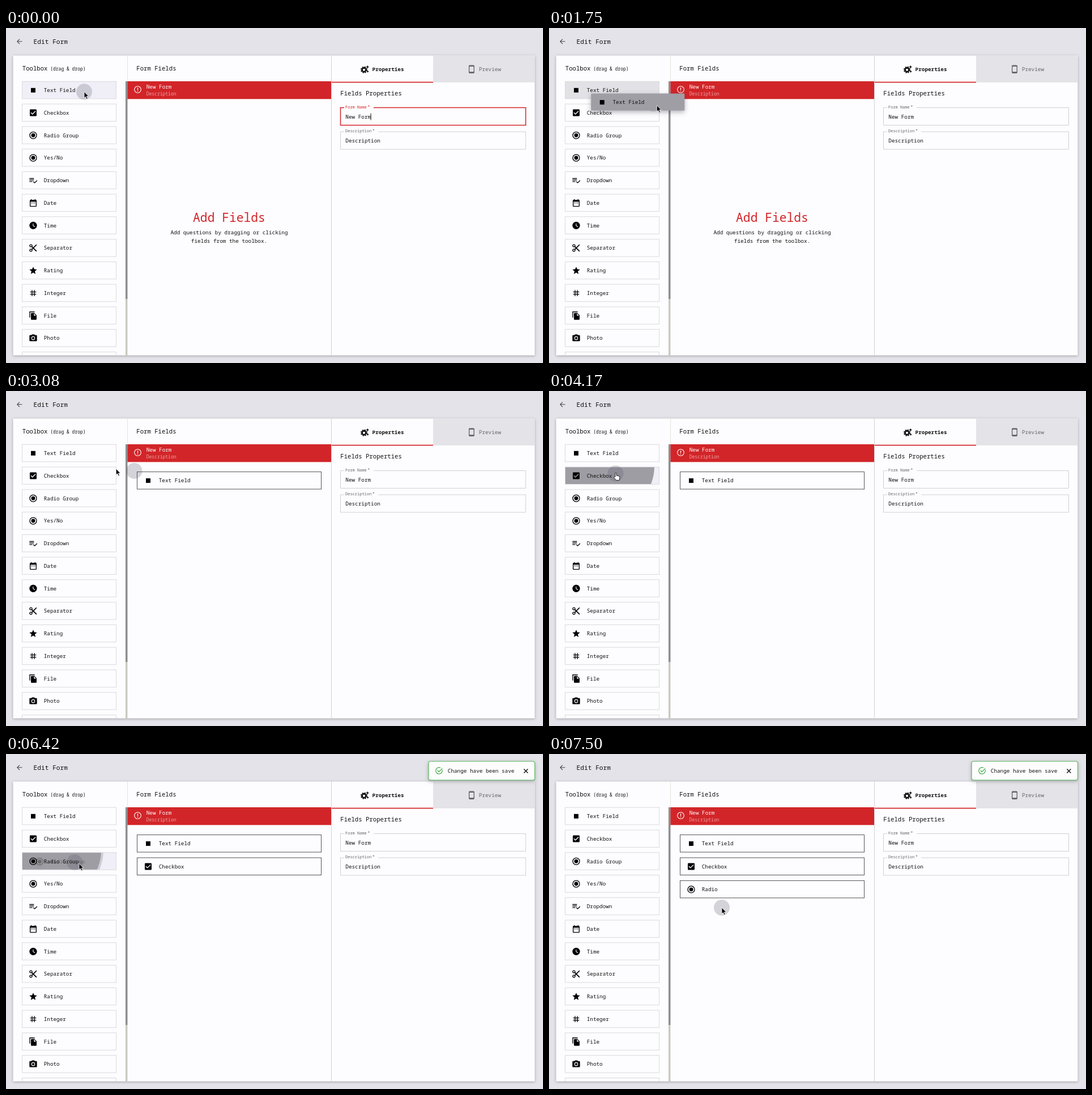
Write an HTML page that moves like this. It is 948 by 591 pixels and loops after 8000 ms.

```html
<!DOCTYPE html>
<html lang="en">
<head>
<meta charset="utf-8">
<title>Edit Form</title>
<style>
html, body { margin: 0; width: 100%; height: 100%; overflow: hidden; background: #e4e3e9; }
svg { display: block; }
#stage { position: absolute; left: 0; top: 0; }
text { font-family: "Noto Sans Mono", "DejaVu Sans Mono", monospace; font-size: 9.33px; fill: #111; white-space: pre; }
.medium { font-weight: 500; }
.bold { font-weight: 600; }
.head { font-size: 10.65px; }
.small { font-size: 8px; }
.label { font-size: 7px; fill: #666; }
.line { fill: none; stroke: currentColor; }
#panel { filter: drop-shadow(0 1px 2px rgba(0,0,0,.3)); }
#ghost { filter: drop-shadow(0 3px 4px rgba(40,40,60,.35)); }
#toast { filter: drop-shadow(0 2px 3px rgba(0,0,0,.25)); }
</style>
</head>
<body>
<svg id="stage" width="948" height="591" viewBox="0 0 948 591"></svg>
<script>
const LOOP = 8000;
const RED = '#d22529';
const ROW = { x: 28.5, y: 94.3, w: 166, h: 30.5, step: 39.76 };
const SLOT = { x: 231.5, y: 142.6, w: 325, step: 40.4 };

// Icons live in a 24-unit box centred on the given point.
const ICONS = {
  square: '<path d="M6 6h12v12H6z"/>',
  check: '<path fill-rule="evenodd" d="M5 3h14a2 2 0 0 1 2 2v14a2 2 0 0 1-2 2H5a2 2 0 0 1-2-2V5a2 2 0 0 1 2-2zM10 17l9-9-1.4-1.4-7.6 7.6-3.6-3.6L5 12z"/>',
  radio: '<circle cx="12" cy="12" r="9" class="line" stroke-width="2"/><circle cx="12" cy="12" r="5.2"/>',
  list: '<path class="line" stroke-width="2" d="M2 7h12M2 11h12M2 15h8M12.2 14.8 16 18.5l6.3-6.3"/>',
  date: '<path fill-rule="evenodd" d="M5 4h1V2h2v2h8V2h2v2h1a2 2 0 0 1 2 2v14a2 2 0 0 1-2 2H5a2 2 0 0 1-2-2V6a2 2 0 0 1 2-2zM5 9v11h14V9zM7 11h2v2H7zM11 11h2v2h-2zM15 11h2v2h-2z"/>',
  time: '<circle cx="12" cy="12" r="10"/><path stroke="#fff" stroke-width="1.6" fill="none" d="M11.8 7v5.6l4.8 2.9"/>',
  cut: '<g class="line" stroke-width="2"><circle cx="6" cy="6" r="3"/><circle cx="6" cy="18" r="3"/><path stroke-width="2.6" d="M8 8 20.8 20.8M8 16 20.8 3.2"/></g>',
  star: '<path d="M12 17.3 18.2 21l-1.7-7L22 9.2l-7.2-.6L12 2 9.2 8.6 2 9.2 7.5 14l-1.7 7z"/>',
  hash: '<path class="line" stroke-width="2" d="M9 4v16M15 4v16M4 9h16M4 15h16"/>',
  file: '<path class="line" stroke-width="2" d="M16 2H3v15"/><path fill-rule="evenodd" d="M8 5h7l6 6v10a2 2 0 0 1-2 2H8a2 2 0 0 1-2-2V7a2 2 0 0 1 2-2zM14 12h5.5L14 6.5z"/>',
  photo: '<path fill-rule="evenodd" d="M9 2 7.2 4H4a2 2 0 0 0-2 2v12a2 2 0 0 0 2 2h16a2 2 0 0 0 2-2V6a2 2 0 0 0-2-2h-3.2L15 2zM12 7a5 5 0 0 1 0 10a5 5 0 0 1 0-10z"/><circle cx="12" cy="12" r="3.2"/>'
};

const TOOLS = [['Text Field', 'square'], ['Checkbox', 'check'], ['Radio Group', 'radio'],
  ['Yes/No', 'radio'], ['Dropdown', 'list'], ['Date', 'date'], ['Time', 'time'],
  ['Separator', 'cut'], ['Rating', 'star'], ['Integer', 'hash'], ['File', 'file'], ['Photo', 'photo']];
const ADDED = ['Text Field', 'Checkbox', 'Radio'];

// One entry per dragged tool; ripple rows are [time, x, y, radius, opacity].
const DRAGS = [
  { press: 670, grab: 1330, enter: 2000, sort: [2000, 2001], drop: 2500, dx: -116, dy: -21,
    ripple: [[670, 145, 115, 0, 1], [1000, 112, 108, 92, 1], [1420, 112, 108, 92, 0]] },
  { press: 4000, grab: 4420, enter: 4670, sort: [4780, 5117], drop: 5330, dx: -91, dy: -10,
    ripple: [[4000, 117, 146, 0, 1], [4150, 102, 133, 84, 1], [4420, 102, 133, 84, 1], [4700, 95, 131, 84, 1]] },
  { press: 6080, grab: 6375, enter: 6620, sort: [6830, 7170], drop: 7500, dx: -89, dy: -19,
    ripple: [[6080, 120, 191, 0, 1], [6330, 86, 170, 82, 1]] }
];

// Pointer tip: [time, x, y]
const PATH = [[600, 138, 112.5], [700, 145, 115], [1330, 145, 115], [1420, 149, 116], [1690, 184, 133],
  [1750, 190, 136.5], [2080, 280, 154], [2250, 300, 160], [2930, 300, 160], [3020, 227, 141],
  [3080, 194.5, 137], [3250, 140, 143], [3580, 117.5, 145.5], [4170, 117.5, 145.5], [4420, 121, 146],
  [4580, 150, 158], [4750, 270, 205], [4850, 303, 220], [5000, 305, 220], [5590, 305, 220],
  [5670, 270, 212], [5750, 195, 199], [5920, 121, 191], [6360, 121, 191], [6420, 128.5, 193],
  [6580, 200, 225], [6750, 290, 265], [6830, 305, 271]];

const text = (x, y, s, cls = '', more = '') => `<text x="${x}" y="${y}" class="${cls}" ${more}>${s}</text>`;
const rect = (x, y, w, h, fill, more = '') => `<rect x="${x}" y="${y}" width="${w}" height="${h}" fill="${fill}" ${more}/>`;
const line = (d, color, width = 1) => `<path d="${d}" fill="none" stroke="${color}" stroke-width="${width}"/>`;
const icon = (x, y, name) => `<g transform="translate(${x - 8} ${y - 8}) scale(.6667)">${ICONS[name]}</g>`;
const caption = (name, kind) => icon(19.5, 15.5, kind) + text(38.2, 18.7, name);
const card = (id, w, name, kind, stroke) =>
  `<g id="${id}">${rect(0, 0, w, ROW.h, '#fdfcfe', `stroke="${stroke}"`)}${caption(name, kind)}</g>`;
const rowY = i => ROW.y + i * ROW.step;

function input(id, y, label, value, notchEnd) {
  const d = `M597 ${y}H590.5v31h327v-31H${notchEnd}`;
  return `<path id="${id}" d="${d}" fill="none" stroke="#d0d0d3"/>` +
    `<text id="${id}Label" x="599" y="${y + 1.4}" class="label">${label}<tspan dx="1.5">*</tspan></text>` +
    text(599.3, y + 19.2, value);
}

function toolbox() {
  const rows = TOOLS.map(([name, kind], i) =>
    `<g transform="translate(${ROW.x} ${rowY(i)})">
      ${rect(0, 0, ROW.w, ROW.h, '#fdfcfe', `id="row${i}" stroke="#dadadd"`)}</g>`).join('');
  const captions = TOOLS.map(([name, kind], i) =>
    `<g transform="translate(${ROW.x} ${rowY(i)})">${caption(name, kind)}</g>`).join('');
  return rows + line(`M28.5 577v-5.5h166v5.5`, '#dadadd') +
    `<svg id="ripple" x="29" width="165" height="29.5">
      <circle id="rippleRing" fill="#cfced6"/><circle id="rippleDisc" fill="#9e9da3"/></svg>` + captions;
}

const gear = `<g stroke="#111" fill="none">
  <circle cx="632" cy="73.8" r="3.4" stroke-width="2.6"/>
  <circle cx="632" cy="73.8" r="5.2" stroke-width="1.6" stroke-dasharray="2.5 1.58"/>
  </g><path d="M638.2 65.8l.9 2 2 .9-2 .9-.9 2-.9-2-2-.9 2-.9zM638.6 74.5l.7 1.5 1.5.7-1.5.7-.7 1.5-.7-1.5-1.5-.7 1.5-.7z"/>`;

document.getElementById('stage').innerHTML = `
  ${rect(0, 0, 948, 591, '#e4e3e9')}
  ${line('M28.5 23.8H20M24 19.6l-4.2 4.2 4.2 4.2', '#444', 1.1)}
  ${text(48.6, 27.8, 'Edit Form', 'medium', 'style="font-size:11.2px"')}
  ${rect(12.5, 48.5, 921, 529, '#fdfcfe', 'id="panel"')}
  ${text(28.8, 75, 'Toolbox', 'head')}${text(78.2, 75, '(drag &amp; drop)', 'small')}
  ${toolbox()}
  ${line('M214.5 48.5v46', '#e6e6dc')}
  ${rect(211, 94, 3.4, 483.5, '#c9c9bf')}${rect(211, 94, 3.4, 384, '#8e8e90')}
  ${text(230.3, 75, 'Form Fields', 'head')}
  ${rect(214.4, 94, 359.6, 31.3, RED)}
  <circle cx="232.5" cy="108.5" r="5.8" fill="none" stroke="#fff" stroke-width="1.1"/>
  ${line('M232.5 105.2v4M232.5 110.4v1.4', '#fff', 1.3)}
  ${text(247.7, 106.7, 'New Form', 'medium', 'style="fill:#fff"')}
  ${text(247.7, 118.8, 'Description', 'small', 'style="fill:#eca2a2"')}
  <g id="empty" text-anchor="middle">
    ${text(394, 342, 'Add Fields', '', `style="font-size:21.3px;fill:${RED}"`)}
    ${text(394, 363.5, 'Add questions by dragging or clicking', 'medium')}
    ${text(394, 378.5, 'fields from the toolbox.', 'medium')}
  </g>
  ${ADDED.map((name, i) => card('entry' + i, SLOT.w, name, TOOLS[i][1], '#555')).join('')}
  ${line('M574.5 48.5v529', '#d2d2d6')}
  ${rect(754, 48.5, 179.5, 47.5, '#e4e3e8')}
  ${rect(575, 94.8, 179, 1.7, RED)}
  ${gear}${text(646.6, 76.2, 'Properties', 'bold')}
  <rect x="817.6" y="66" width="8.6" height="13.4" rx="1.3" fill="none" stroke="#555" stroke-width="1.2"/>
  ${line('M817.6 67.3h8.6M817.6 78h8.6', '#555', 1.4)}
  ${text(834.8, 76.2, 'Preview', 'medium', 'style="fill:#666"')}
  ${text(590.3, 118.6, 'Fields Properties', 'head')}
  ${input('name', 140.5, 'Form Name', 'New Form', 649)}
  ${input('about', 183, 'Description', 'Description', 657)}
  ${rect(643.6, 150.5, 1, 12, '#111', 'id="caret"')}
  <circle id="halo" r="14" fill="#55556a" fill-opacity=".24"/>
  <g id="ghost">${rect(0, 0, 165, 30, '#9f9ea5', 'id="ghostBack"')}
    ${ADDED.map((_, i) => `<g id="ghost${i}">${caption(...TOOLS[i])}</g>`).join('')}</g>
  <g id="toast">
    ${rect(746, 13, 187.5, 33, '#fdfdfd', 'rx="3" stroke="#5cb860" stroke-width="1.2"')}
    ${line('M770 27.6a5.8 5.8 0 1 1-3-3.4M761.6 28.8l2.6 2.6 6-6', '#3fa844', 1.2)}
    ${text(779.8, 33, 'Change have been save')}
    ${line('M914.3 26.4l7 7M921.3 26.4l-7 7', '#111', 1.4)}
  </g>
  <g id="pointer">
    <path id="arrow" d="M0 0v11l2.5-2.3 1.9 4.2 1.9-.8-1.9-4.1h3.5z" stroke="#fff" stroke-width=".8"/>
    <path id="hand" d="M-.6 6V0a1.1 1.1 0 0 1 2.2 0v3.6l4.6 1.1q1.4.4 1.3 1.8l-.7 5.4H1l-4-5q.6-1.3 2.4-.9z"
      fill="#fff" stroke="#111" stroke-width=".9"/>
  </g>`;

const $ = {};
document.querySelectorAll('[id]').forEach(e => $[e.id] = e);
const show = (e, on) => e.style.display = on ? '' : 'none';
const move = (e, x, y) => e.setAttribute('transform', `translate(${x} ${y})`);
const set = (e, attrs) => { for (const k in attrs) e.setAttribute(k, attrs[k]); };
const ramp = (t, a, b) => Math.min(1, Math.max(0, (t - a) / (b - a)));
const easeOut = u => 1 - (1 - u) ** 3;
const between = (t, a, b) => t >= a && t < b;

function track(keys, t) {
  const n = keys.findIndex(k => k[0] > t);
  if (n === 0) return keys[0].slice(1);
  if (n < 0) return keys[keys.length - 1].slice(1);
  const a = keys[n - 1], b = keys[n], u = ramp(t, a[0], b[0]);
  return a.slice(1).map((v, i) => v + (b[i + 1] - v) * u);
}

function drawRows(t, x, y) {
  TOOLS.forEach((_, i) => {
    const d = DRAGS[i], top = rowY(i);
    const over = x > 29 && x < 194 && y > top && y < top + ROW.h;
    const dragging = d && between(t, d.press, d.drop);
    const idle = !DRAGS.some(g => between(t, g.grab, g.drop));
    const fill = i === 0 && dragging && t > 1000 ? '#e2e2e6' : dragging || over && idle ? '#f0eff8' : '#fdfcfe';
    $['row' + i].setAttribute('fill', fill);
  });
}

function drawRipple(t, i) {
  show($.ripple, i >= 0);
  if (i < 0) return;
  const [x, y, r, opacity] = track(DRAGS[i].ripple, t);
  const top = rowY(i) + .5, spot = { cx: x - 29, cy: y - top };
  set($.ripple, { y: top, opacity });
  set($.rippleDisc, { ...spot, r });
  set($.rippleRing, { ...spot, r: i === 2 && r ? r + 4 : 0 });
}

function drawEntries(t) {
  const slots = ADDED.map((_, i) => i);
  DRAGS.forEach((d, i) => {
    if (!between(t, d.enter, d.drop)) return;
    const p = easeOut(ramp(t, ...d.sort));
    for (let j = 0; j < i; j++) slots[j] = j + 1 - p;
    slots[i] = i * p;
  });
  ADDED.forEach((_, i) => {
    const e = $['entry' + i];
    show(e, t >= DRAGS[i].enter);
    move(e, SLOT.x, SLOT.y + slots[i] * SLOT.step);
    e.firstChild.setAttribute('stroke', t < DRAGS[i].drop ? '#dcdce0' : '#555');
  });
}

function drawGhost(t, x, y) {
  const i = DRAGS.findIndex(d => between(t, d.grab, d.drop));
  show($.ghost, i >= 0);
  if (i < 0) return;
  const d = DRAGS[i], fresh = i === 2 && t < 6460;
  move($.ghost, x + d.dx, y + d.dy);
  $.ghost.setAttribute('opacity', fresh ? .3 : 1);
  show($.ghostBack, !fresh);
  ADDED.forEach((_, j) => show($['ghost' + j], j === i));
}

function draw(t) {
  const [x, y] = track(PATH, t), [hx, hy] = track(PATH, t - 60);
  const focused = t < 750;
  set($.name, { stroke: focused ? RED : '#d0d0d3', 'stroke-width': focused ? 1.5 : 1 });
  $.nameLabel.style.fill = focused ? RED : '';
  show($.caret, t < 500);
  show($.empty, t < DRAGS[0].drop);

  drawRows(t, x, y);
  drawRipple(t, DRAGS.findIndex(d => between(t, d.press, d.drop)));
  drawEntries(t);
  drawGhost(t, x, y);

  move($.halo, hx, hy);
  move($.pointer, x, y);
  const hand = between(t, 3500, 4420) || between(t, 5900, 6330);
  show($.hand, hand);
  show($.arrow, !hand);

  show($.toast, t >= 4580);
  move($.toast, 210 * (1 - easeOut(ramp(t, 4580, 4830))), 0);
}

const start = performance.now();
function tick() {
  draw((performance.now() - start) % LOOP);
  requestAnimationFrame(tick);
}
tick();
</script>
</body>
</html>
```
